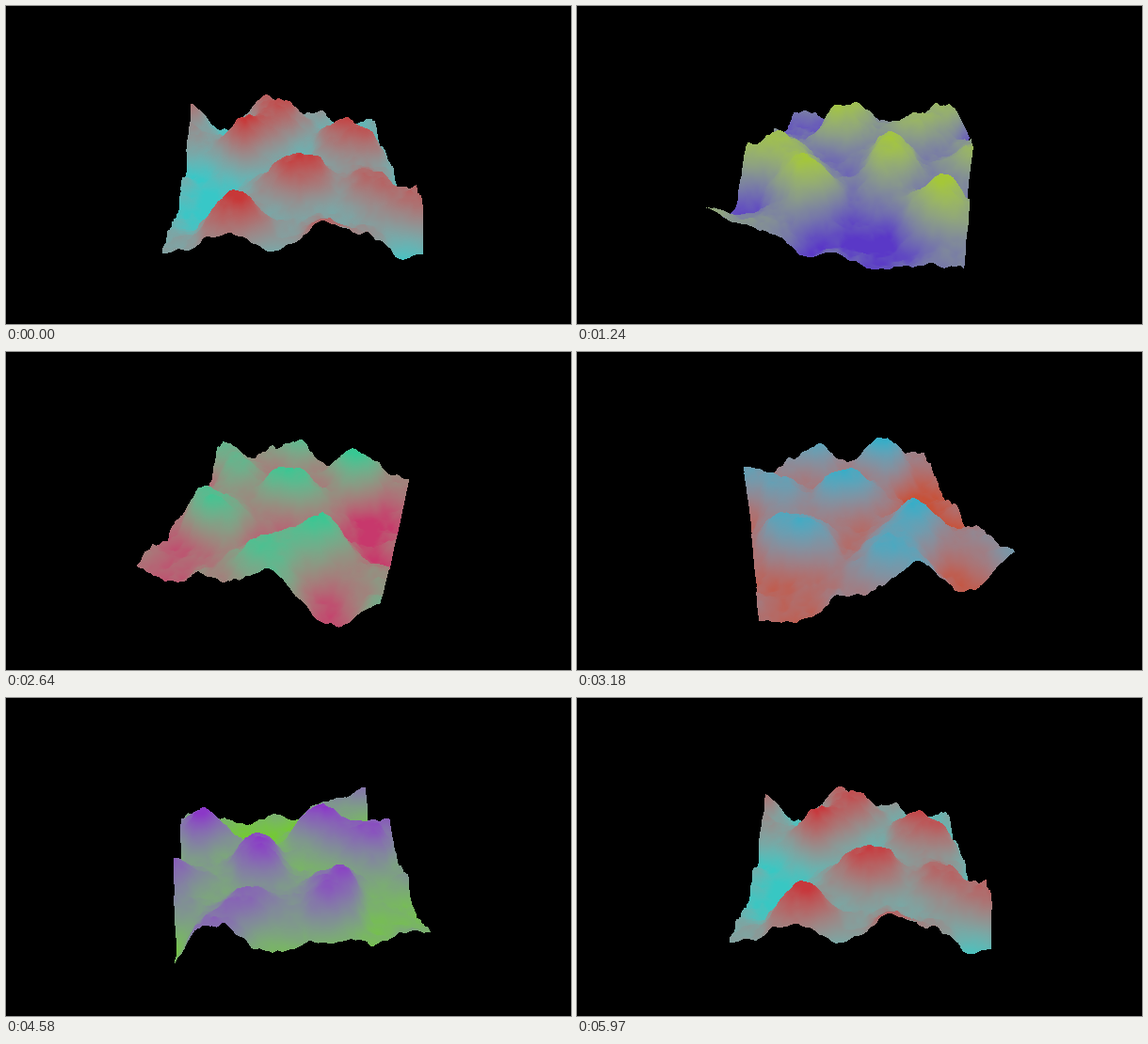
Animation of 600 by 338 pixels, one loop 6000 ms. Source, as an HTML page with a canvas:

```html
<!DOCTYPE html>
<html lang="en">
<head>
<meta charset="utf-8">
<title>Turning terrain</title>
<style>
html, body { margin: 0; width: 100%; height: 100%; overflow: hidden; background: #000; }
canvas { display: block; width: 600px; height: 338px; }
</style>
</head>
<body>
<canvas id="stage" width="600" height="338"></canvas>
<script>
const W = 600, H = 338, LOOP = 6000;
const N = 128, SIDE = N + 1;
const START = 3 * Math.PI / 180;
const FOCAL = 480, DIST = 4.2, COS = 0.81, SIN = 0.588;
const LOW = -0.26, HIGH = 0.3;

// Coarse heights in hundredths; rows run back to front, columns left to right
const HILLS = [
  [14, -13, -20, 2, 21, 5, -6, 0, -17, -19, -9],
  [8, -8, -18, -4, 21, 26, 6, -8, -14, -18, -8],
  [4, -4, -4, 13, 19, 16, 0, -3, -10, -17, -17],
  [-7, -6, 8, 29, 18, 0, -11, 15, 22, 5, -13],
  [-21, -19, -2, 18, 0, -11, -8, 12, 21, 19, -8],
  [-14, -23, -20, -11, -6, -4, -4, -2, 4, 4, -8],
  [-20, -26, -24, -10, 8, 26, 24, 2, 7, 2, -16],
  [-23, -26, -23, -5, 6, 22, 18, 3, 18, 13, -8],
  [-14, -20, 3, 14, -6, -2, -3, -4, 8, 17, 15],
  [-5, -6, 19, 31, 7, -4, 4, -3, -3, 4, 12],
  [-7, -2, 11, 9, -3, 2, 20, 10, 2, -19, -15]
];

const clamp = (x, lo, hi) => Math.max(lo, Math.min(hi, x));

function spline(a, b, c, d, t) {
  return b + 0.5 * t * (c - a + t * (2 * a - 5 * b + 4 * c - d + t * (3 * (b - c) + d - a)));
}

function along(get, x) {
  const i = Math.min(9, Math.floor(x));
  const at = k => get(clamp(k, 0, 10));
  return spline(at(i - 1), at(i), at(i + 1), at(i + 2), x - i);
}

function hash(x, y) {
  const s = Math.sin(x * 127.1 + y * 311.7) * 43758.5453;
  return (s - Math.floor(s)) * 2 - 1;
}

function noise(x, y) {
  const i = Math.floor(x), j = Math.floor(y);
  const s = x - i, t = y - j;
  const top = hash(i, j) * (1 - s) + hash(i + 1, j) * s;
  const low = hash(i, j + 1) * (1 - s) + hash(i + 1, j + 1) * s;
  return top * (1 - t) + low * t;
}

function heightAt(u, v) {
  const x = (u + 1) * 5, y = (v + 1) * 5;
  const hill = along(r => along(c => HILLS[r][c], x), y) / 100;
  return hill + 0.025 * noise(u * 8, v * 8) + 0.028 * noise(u * 15 + 40, v * 15)
    + 0.018 * noise(u * 31, v * 31 + 70);
}

const count = SIDE * SIDE;
const ground = new Float32Array(count), shade = new Float32Array(count);
for (let j = 0; j < SIDE; j++) {
  for (let i = 0; i < SIDE; i++) {
    const y = heightAt(i / N * 2 - 1, j / N * 2 - 1);
    ground[j * SIDE + i] = y;
    shade[j * SIDE + i] = clamp((y - LOW) / (HIGH - LOW), 0, 1) * 255;
  }
}

const px = new Float32Array(count), py = new Float32Array(count), pz = new Float32Array(count);
const depth = new Float32Array(W * H);
const palette = new Uint32Array(256);
const ctx = document.getElementById("stage").getContext("2d");
const image = ctx.createImageData(W, H);
const pixels = new Uint32Array(image.data.buffer);
const BLACK = 0xff000000;

function rgb(hue) {
  return [0, 8, 4].map(n => {
    const k = (n + hue / 30) % 12;
    return 255 * (0.5 - 0.28 * Math.max(-1, Math.min(k - 3, 9 - k, 1)));
  });
}

function setPalette(hue) {
  const peak = rgb(hue), valley = rgb(hue + 180);
  for (let i = 0; i < 256; i++) {
    const k = i / 255;
    const [r, g, b] = peak.map((p, n) => Math.round(Math.sqrt(p * p * k + valley[n] * valley[n] * (1 - k))));
    palette[i] = (BLACK | b << 16 | g << 8 | r) >>> 0;
  }
}

function project(angle) {
  const ca = Math.cos(angle), sa = Math.sin(angle);
  for (let j = 0, n = 0; j < SIDE; j++) {
    const v = j / N * 2 - 1;
    for (let i = 0; i < SIDE; i++, n++) {
      const u = i / N * 2 - 1, y = ground[n];
      const x = u * ca + v * sa, z = v * ca - u * sa;
      const d = DIST - z * COS - y * SIN;
      px[n] = W / 2 + FOCAL * x / d;
      py[n] = H / 2 + FOCAL * (z * SIN - y * COS) / d;
      pz[n] = d;
    }
  }
}

function triangle(a, b, c) {
  const ax = px[a], ay = py[a], bx = px[b], by = py[b], cx = px[c], cy = py[c];
  const area = (bx - ax) * (cy - ay) - (by - ay) * (cx - ax);
  if (Math.abs(area) < 1e-6) return;
  const x0 = Math.max(0, Math.ceil(Math.min(ax, bx, cx) - 0.5));
  const x1 = Math.min(W - 1, Math.floor(Math.max(ax, bx, cx) - 0.5));
  const y0 = Math.max(0, Math.ceil(Math.min(ay, by, cy) - 0.5));
  const y1 = Math.min(H - 1, Math.floor(Math.max(ay, by, cy) - 0.5));
  for (let y = y0; y <= y1; y++) {
    for (let x = x0; x <= x1; x++) {
      const qx = x + 0.5 - ax, qy = y + 0.5 - ay;
      const s = (qx * (cy - ay) - qy * (cx - ax)) / area;
      const t = (qy * (bx - ax) - qx * (by - ay)) / area;
      const r = 1 - s - t;
      if (s < -1e-5 || t < -1e-5 || r < -1e-5) continue;
      const d = r * pz[a] + s * pz[b] + t * pz[c], n = y * W + x;
      if (d >= depth[n]) continue;
      depth[n] = d;
      pixels[n] = palette[clamp(Math.round(r * shade[a] + s * shade[b] + t * shade[c]), 0, 255)];
    }
  }
}

function draw(ms) {
  const turn = ms % LOOP / LOOP;
  setPalette(turn * 360);
  project(START + turn * 2 * Math.PI);
  depth.fill(1e9);
  pixels.fill(BLACK);
  for (let j = 0; j < N; j++) {
    for (let i = 0; i < N; i++) {
      const n = j * SIDE + i;
      triangle(n, n + 1, n + SIDE);
      triangle(n + 1, n + SIDE + 1, n + SIDE);
    }
  }
  ctx.putImageData(image, 0, 0);
}

let begin;
function tick(now) {
  if (begin === undefined) begin = now;
  draw(now - begin);
  requestAnimationFrame(tick);
}
draw(0);
requestAnimationFrame(tick);
</script>
</body>
</html>
```
